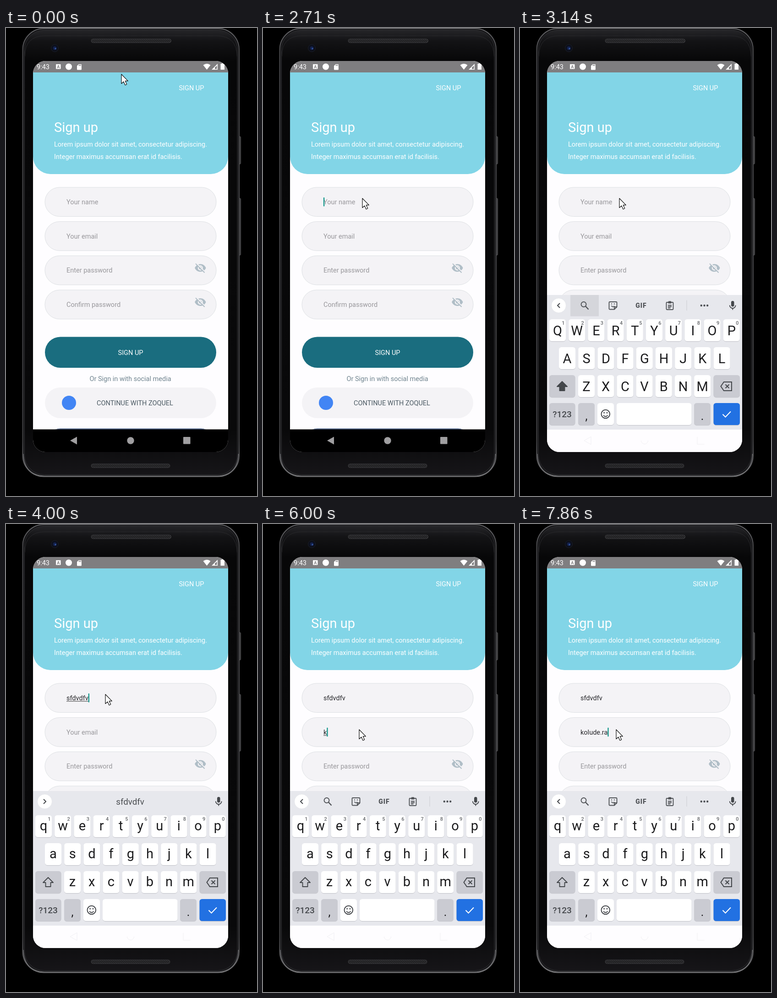
Animation of 548 by 1022 pixels, one loop 8 s. Source, as an HTML page:

```html
<!DOCTYPE html>
<html lang="en">
<head>
<meta charset="utf-8">
<title>Sign up form</title>
<style>
html, body { margin: 0; width: 100%; height: 100%; overflow: hidden; background: #000; }
svg { display: block; width: 548px; height: 1022px; font-family: Roboto, sans-serif; }
text { white-space: pre; }
</style>
</head>
<body>
<svg viewBox="0 0 548 1022">
  <defs>
    <linearGradient id="rim" x1="0" y1="0" x2="0" y2="1">
      <stop offset="0" stop-color="#67676a"/><stop offset=".05" stop-color="#4b4b4e"/>
      <stop offset=".92" stop-color="#454548"/><stop offset="1" stop-color="#777779"/>
    </linearGradient>
    <linearGradient id="face" x1="0" y1="0" x2="0" y2="1">
      <stop offset="0" stop-color="#252528"/><stop offset=".025" stop-color="#131315"/>
      <stop offset=".07" stop-color="#070708"/><stop offset=".9" stop-color="#09090a"/>
      <stop offset="1" stop-color="#161518"/>
    </linearGradient>
    <pattern id="mesh" width="4" height="4" patternUnits="userSpaceOnUse">
      <rect width="4" height="4" fill="#1c1c1e"/><path d="M0 4L4 0" stroke="#454547"/>
    </pattern>
    <clipPath id="screen"><rect x="59" y="72" width="426" height="854" rx="27"/></clipPath>
    <clipPath id="page"><rect x="59" y="72" width="426" height="804.5"/></clipPath>
    <path id="eye" fill="#b0bec7" d="M12 7c2.76 0 5 2.24 5 5 0 .65-.13 1.26-.36 1.83l2.92 2.92c1.51-1.26 2.7-2.89 3.43-4.75-1.73-4.39-6-7.5-11-7.5-1.4 0-2.74.25-3.98.7l2.16 2.16C10.74 7.13 11.35 7 12 7zM2 4.27l2.28 2.28.46.46C3.08 8.3 1.78 10.02 1 12c1.73 4.39 6 7.5 11 7.5 1.55 0 3.03-.3 4.38-.84l.42.42L19.73 22 21 20.73 3.27 3 2 4.27zM7.53 9.8l1.55 1.55c-.05.21-.08.43-.08.65 0 1.66 1.34 3 3 3 .22 0 .44-.03.65-.08l1.55 1.55c-.67.33-1.41.53-2.2.53-2.76 0-5-2.24-5-5 0-.79.2-1.53.53-2.2zm4.31-.78l3.15 3.15.02-.16c0-1.66-1.34-3-3-3l-.17.01z"/>
  </defs>

  <!-- phone -->
  <g fill="#38383a" stroke="#626264" stroke-width=".8">
    <rect x="508" y="237" width="4.5" height="60" rx="1.5"/>
    <rect x="508" y="372" width="4.5" height="124" rx="1.5"/>
  </g>
  <rect x="36.5" y="1" width="472.5" height="978.5" rx="46" fill="#161618" stroke="url(#rim)" stroke-width="2"/>
  <rect x="40.5" y="4.5" width="464.5" height="971" rx="43" fill="url(#face)" stroke="#303033"/>
  <path d="M41 62Q41 18 84 17H461Q504 18 504.500 62" fill="none" stroke="#29292c"/>
  <path d="M38 930Q40 977 84 978H462Q505 977 507.500 930" fill="none" stroke="#727275" stroke-width="1.2"/>
  <g fill="url(#mesh)" stroke="#3d3d40">
    <rect x="186" y="24" width="174.500" height="8" rx="4"/>
    <rect x="186" y="952" width="172" height="8" rx="4"/>
  </g>
  <circle cx="106.500" cy="44" r="8" fill="#0c0f1a" stroke="#1c1f29"/>
  <circle cx="106.500" cy="44" r="4" fill="#13204a"/>
  <circle cx="108" cy="45" r="1.800" fill="#3556a0"/>

  <g clip-path="url(#screen)">
    <rect x="59" y="72" width="426" height="854" fill="#fefdff"/>
    <g clip-path="url(#page)">
      <path d="M59 97H485V281A38 38 0 0 1 447 319H97A38 38 0 0 1 59 281Z" fill="#82d5e7"/>
      <rect x="59" y="72" width="426" height="25" fill="#7f7e80"/>
      <g fill="#fff" font-size="14.5">
        <text x="67" y="90">9:43</text>
        <text x="377.500" y="136">SIGN UP</text>
        <text x="105" y="227" font-size="29">Sign up</text>
        <text x="105" y="258.500">Lorem ipsum dolor sit amet, consectetur adipiscing.</text>
        <text x="105" y="286">Integer maximus accumsan erat id facilisis.</text>
        <rect x="109" y="79" width="10.500" height="10.500" rx="1"/>
        <text x="114.250" y="87.500" font-size="9" font-weight="700" fill="#7f7e80" text-anchor="middle">A</text>
        <circle cx="137" cy="84.500" r="7"/>
        <path transform="translate(152.500 77.800) scale(.62)" fill-rule="evenodd" d="M18 2h-8L4 8v12c0 1.100.900 2 2 2h12c1.100 0 2-.900 2-2V4c0-1.100-.900-2-2-2zm-6 6h-2V4h2v4zm3 0h-2V4h2v4zm3 0h-2V4h2v4z"/>
        <path d="M430.500 81Q438.500 75 446.500 81L438.500 91Z"/>
        <path d="M462 78V91H449ZM460.500 82L453 89.500H460.500Z" fill-rule="evenodd"/>
        <path d="M456 85V91H450Z"/>
        <path d="M471 78V77H475V78H477V91H468.500V78Z"/>
      </g>
      <g id="fields" font-size="14.5"></g>
      <rect x="85" y="674.500" width="374" height="67.500" rx="33.700" fill="#1a6d7f"/>
      <rect x="85" y="785" width="374" height="67" rx="33.500" fill="#f4f3f6"/>
      <rect x="85" y="874.800" width="374" height="67" rx="33.500" fill="#1c3768"/>
      <circle cx="137.500" cy="818.500" r="15.500" fill="#4285f4"/>
      <g font-size="14.5" text-anchor="middle">
        <text x="272" y="714" fill="#fff">SIGN UP</text>
        <text x="271.500" y="771" fill="#70848f">Or Sign in with social media</text>
        <text x="281.500" y="824" fill="#4a5962">CONTINUE WITH ZOQUEL</text>
      </g>
    </g>

    <g id="navDark">
      <rect x="59" y="876.500" width="426" height="50"/>
      <g fill="#a09fa1">
        <path d="M140 901L155 892.500V909.500Z"/><circle cx="272" cy="901" r="7.700"/><rect x="387" y="893" width="15.500" height="15.500" rx="1"/>
      </g>
    </g>

    <g id="board">
      <rect x="59" y="583" width="426" height="294" fill="#e7e8ed"/>
      <rect x="59" y="877" width="426" height="50" fill="#fefdff"/>
      <g fill="none" stroke="#f0eff3">
        <path d="M140 901L155 892.500V909.500Z"/><path d="M264.500 901A7.500 7.500 0 0 0 279.500 901"/><path d="M387 893V909H402.500"/>
      </g>
      <rect id="press" x="110" y="583" width="62" height="46.500" fill="#d5d6db"/>
      <circle cx="84.500" cy="606" r="16" fill="#fff" stroke="#dcdde2" stroke-width=".6"/>
      <path id="chevron" fill="none" stroke="#44474b" stroke-width="2"/>
      <g id="tools" fill="none" stroke="#505357" stroke-width="1.900">
        <circle cx="139" cy="603.500" r="5.500"/><path d="M143 607.500L149.500 614.500" stroke-width="2.400"/>
        <path d="M196 598H210Q211.500 598 211.500 599.500V609L206 614.500H196Q194.500 614.500 194.500 613V599.500Q194.500 598 196 598ZM206 614V609H211M199.500 606.500Q203 611 206 607"/>
        <path d="M199 602.500H201M205 602.500H207" stroke-width="2.200"/>
        <rect x="319.500" y="599" width="15" height="16" rx="1.500"/><path d="M323.500 600.500H330.500M323 605.500H331M323 608.500H331M323 611.500H328.500"/>
        <path d="M324 598H330" stroke-width="3"/>
        <path d="M364 594.500V617" stroke="#cbccd1" stroke-width="1"/>
        <text x="264.500" y="611" font-size="14" font-weight="900" letter-spacing="1" text-anchor="middle" fill="#505357" stroke="none">GIF</text>
        <g fill="#505357" stroke="none"><circle cx="395.800" cy="606" r="2.200"/><circle cx="402.500" cy="606" r="2.200"/><circle cx="409.200" cy="606" r="2.200"/></g>
      </g>
      <text id="suggest" x="271" y="613" font-size="18.700" text-anchor="middle" fill="#4b4e52"></text>
      <rect x="461" y="596" width="6.500" height="12.500" rx="3.200" fill="#44474b"/>
      <path d="M457.800 605.500A6.400 6.400 0 0 0 470.700 605.500M464.250 612V615.500" fill="none" stroke="#44474b" stroke-width="1.900"/>
      <g id="keys" text-anchor="middle"></g>
      <path id="shift" d="M92 772L103 783H97.500V792H86.500V783H81Z" stroke="#44474b" stroke-width="1.900" stroke-linejoin="round"/>
      <g fill="none" stroke="#44474b" stroke-width="2">
        <path d="M445 773H462V792H445L438.500 782.500ZM448.500 778.500L456.500 786.500M456.500 778.500L448.500 786.500"/>
        <circle cx="186.800" cy="843" r="9.300"/><path d="M182 845.500Q186.800 851.500 191.600 845.500"/>
        <path d="M182.300 840.200H184.900M188.700 840.200H191.300" stroke-width="2.600"/>
        <path d="M442.500 843.500L448.500 849.500L460 837.500" stroke="#fff"/>
      </g>
    </g>
  </g>

  <path id="pointer" d="M0 0V20.500L4.700 16.200L8.200 23.700L11.700 22L8.300 14.700H14.300Z" fill="#fff" stroke="#111" stroke-width="1.200" stroke-linejoin="round"/>
</svg>
<script>
const NS = 'http://www.w3.org/2000/svg';
const $ = id => document.getElementById(id);
function add(parent, tag, attrs, text = '') {
  const el = document.createElementNS(NS, tag);
  for (const k in attrs) el.setAttribute(k, attrs[k]);
  el.textContent = text;
  return parent.appendChild(el);
}
const show = (el, on) => el.setAttribute('visibility', on ? 'visible' : 'hidden');
const put = (el, s) => { if (el.textContent !== s) el.textContent = s; };

// form fields
const hints = ['Your name', 'Your email', 'Enter password', 'Confirm password'];
const fields = hints.map((hint, i) => {
  const top = 348 + i * 74.7, g = $('fields');
  add(g, 'rect', { x: 85, y: top, width: 374, height: 63.5, rx: 31.7, fill: '#f4f3f6', stroke: '#dadde0', 'stroke-width': .9 });
  if (i > 1) add(g, 'use', { href: '#eye', transform: `translate(411 ${top + 13.2}) scale(1.11)` });
  return {
    hint,
    label: add(g, 'text', { x: 132, y: top + 37 }),
    line: add(g, 'rect', { x: 132, y: top + 38.6, height: 1, fill: '#333' }),
    caret: add(g, 'rect', { y: top + 22, width: 2.2, height: 19.5, rx: .8, fill: '#0d9488' })
  };
});

// keyboard
const letters = [];
function key(x, y, w, fill = '#fff') {
  add($('keys'), 'rect', { x, y: y + 1.2, width: w, height: 48, rx: 5.5, fill: '#c6c7cd' });
  add($('keys'), 'rect', { x, y, width: w, height: 48, rx: 5.5, fill });
}
[['qwertyuiop', 64, 636], ['asdfghjkl', 85, 697], ['zxcvbnm', 127, 758]].forEach(([row, x0, y], r) => {
  [...row].forEach((ch, i) => {
    const x = x0 + i * 42.2;
    key(x, y, 36);
    letters.push({ ch, y, el: add($('keys'), 'text', { x: x + 18, 'font-size': 29, fill: '#1b1b1d' }) });
    if (!r) add($('keys'), 'text', { x: x + 30.5, y: y + 12, 'font-size': 11, 'font-weight': 500, fill: '#66686c' }, String((i + 1) % 10));
  });
});
const grey = '#cacbd2';
key(64, 758, 56.5, grey); key(422.5, 758, 57.5, grey);
key(64, 819, 56.5, grey); key(127, 819, 36, grey); key(169, 819, 36);
key(211, 819, 163.5); key(380, 819, 36, grey); key(422.5, 819, 57.5, '#2271e2');
add($('keys'), 'text', { x: 92, y: 850, 'font-size': 19, 'font-weight': 500, fill: '#44474b' }, '?123');
add($('keys'), 'text', { x: 145, y: 856, 'font-size': 25, fill: '#1b1b1d' }, ',');
add($('keys'), 'text', { x: 398, y: 856, 'font-size': 25, fill: '#1b1b1d' }, '.');

// timeline in ticks of 1/7 s
const RATE = 7, LOOP = 8000;
const path = [
  [0, 252, 101], [1, 249, 118], [2, 239, 190], [3, 226, 270], [4, 214, 328], [7, 207, 362],
  [9, 202, 386], [10, 200, 394], [11, 204, 390], [12, 209, 383], [14, 213, 377],
  [16, 216, 373], [17, 217, 372], [29, 216, 390], [30, 212, 428], [31, 210, 449]
];
const OPEN = 21, NAME = 18, EMAIL = 35;
const name = { text: 'sfdvdfv', keys: [23, 24, 25, 26, 27, 28, 28] };
const email = { text: 'kolude.ra', keys: [42, 43, 45, 46, 48, 49, 51, 53, 55] };

function fill(field, typed, tick, focusAt, blurAt) {
  const past = typed ? typed.keys.filter(k => k <= tick) : [];
  const value = typed ? typed.text.slice(0, past.length) : '';
  const focus = tick >= focusAt && tick < blurAt;
  put(field.label, value || field.hint);
  field.label.setAttribute('fill', value ? '#26262a' : '#98979b');
  const width = value ? field.label.getComputedTextLength() : 0;
  const since = (tick - (past.length ? past[past.length - 1] : focusAt)) / RATE;
  field.caret.setAttribute('x', 132 + width);
  show(field.caret, focus && since % 1 < .5);
  field.line.setAttribute('width', width);
  show(field.line, focus && value && !value.includes('.'));
  return value;
}

function draw(ms) {
  const tick = Math.floor((ms + 4) * RATE / 1000);
  const [, x, y] = path.filter(p => p[0] <= tick).pop();
  $('pointer').setAttribute('transform', `translate(${x} ${y})`);

  const value = fill(fields[0], name, tick, NAME, EMAIL);
  fill(fields[1], email, tick, EMAIL, 99);
  fill(fields[2], null, tick, 99, 99);
  fill(fields[3], null, tick, 99, 99);

  const open = tick >= OPEN, caps = !value;
  const guess = value && tick <= EMAIL;
  $('board').setAttribute('display', open ? 'inline' : 'none');
  show($('navDark'), !open);
  $('press').setAttribute('display', caps ? 'inline' : 'none');
  $('tools').setAttribute('display', guess ? 'none' : 'inline');
  put($('suggest'), guess ? value : '');
  $('chevron').setAttribute('d', guess ? 'M82 601L87 606L82 611' : 'M87 601L82 606L87 611');
  $('shift').setAttribute('fill', caps ? '#44474b' : 'none');
  for (const { ch, y, el } of letters) {
    put(el, caps ? ch.toUpperCase() : ch);
    el.setAttribute('y', y + (caps ? 35 : 32.5));
  }
}

const start = performance.now();
function loop() {
  draw((performance.now() - start) % LOOP);
  requestAnimationFrame(loop);
}
draw(0);
requestAnimationFrame(loop);
</script>
</body>
</html>
```
